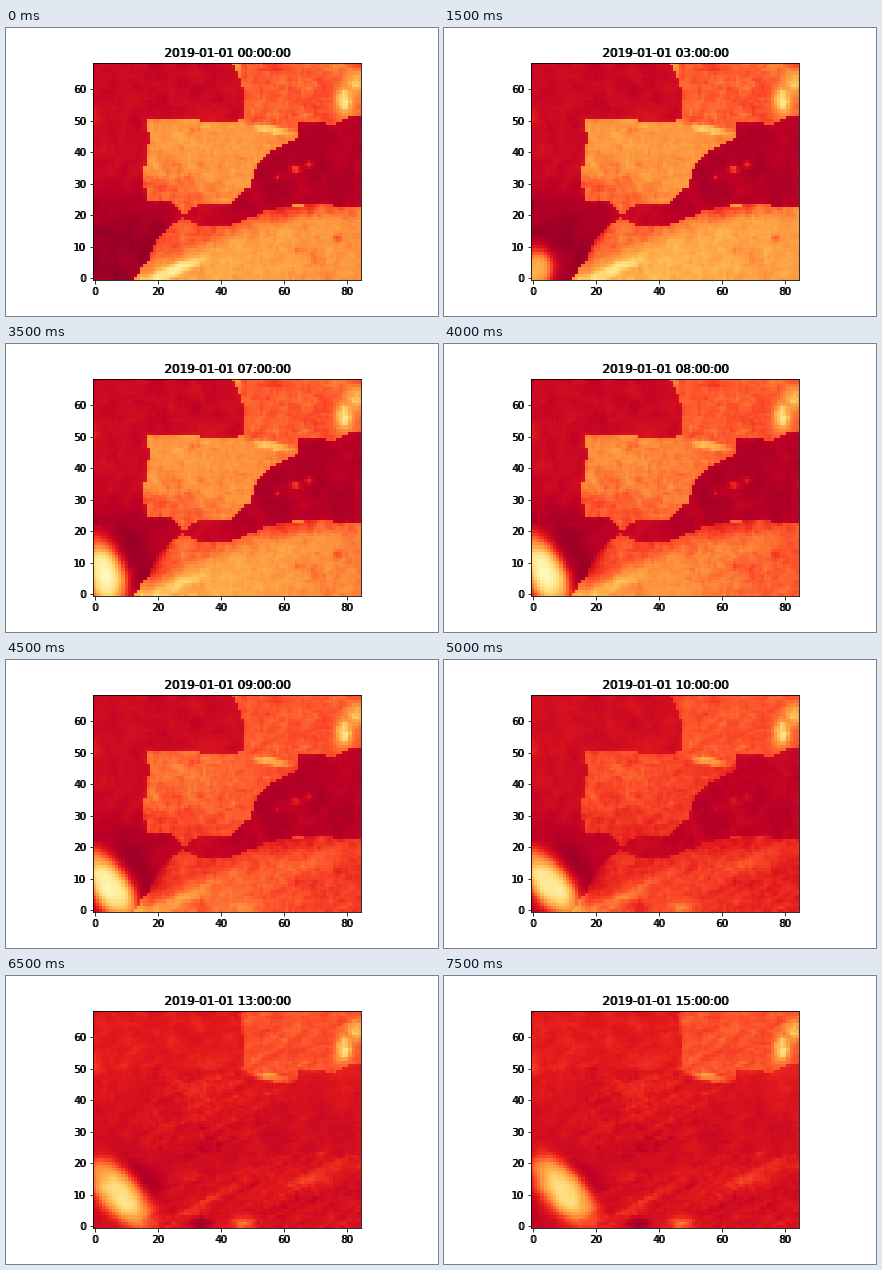
Animation, 432 px wide and 288 px high, one loop 8000 ms. Source, as a matplotlib script:

```python
import numpy as np
import matplotlib.pyplot as plt
from matplotlib.animation import FuncAnimation
from matplotlib.path import Path

NX, NY, HOURS = 85, 69, 16
X, Y = np.meshgrid(np.arange(NX), np.arange(NY))
rng = np.random.default_rng(7)


def smooth(a, n=1):
    for _ in range(n):
        p = np.pad(a, 1, mode="edge")
        a = (4 * a + p[:-2, 1:-1] + p[2:, 1:-1] + p[1:-1, :-2] + p[1:-1, 2:]) / 8
    return a


def noise(n, streak=1):
    """Smoothed random texture, optionally drawn out along a gentle slope."""
    a = smooth(rng.normal(size=(NY, NX)), n)
    a = sum(np.roll(a, (k // 2, k), (0, 1)) for k in range(streak))
    return a / a.std()


def ease(v, lo, hi):
    t = np.clip((v - lo) / (hi - lo), 0, 1)
    return t * t * (3 - 2 * t)


def bump(x, y, sx, sy, tilt=0, power=1):
    """Soft ellipse; tilt turns the long (y) axis to the left, in degrees."""
    c, s = np.cos(np.radians(tilt)), np.sin(np.radians(tilt))
    u = (X - x) * c + (Y - y) * s
    v = (Y - y) * c - (X - x) * s
    return np.exp(-((u / sx) ** 2 + (v / sy) ** 2) ** power)


def region(*pts):
    inside = Path(pts).contains_points(np.c_[X.ravel(), Y.ravel()])
    return inside.reshape(X.shape).astype(float)


europe = region(
    (43, 70), (47.4, 60), (47.2, 51), (45.5, 49.6), (16, 50.6), (17.4, 45),
    (15.4, 32), (16.6, 24.6), (24, 24.4), (28, 20), (32, 23), (43, 23.4),
    (49, 29), (51, 35), (55, 40), (64, 44.5), (64.5, 49.6), (72, 49.6),
    (75, 48.4), (80, 51), (86, 52), (86, 70))
africa = region(
    (12.3, -1), (17, 6), (20, 13), (28, 19.6), (32.5, 16.8), (43.5, 16.8),
    (55, 21.6), (66, 23.6), (86, 22.4), (86, -1))
islands = bump(63.6, 34.6, 1.4, 0.9) + 0.6 * (bump(68, 36, 1, 1) + bump(58, 32, 0.7, 0.7))
coast = europe + africa
land = np.clip(0.75 * coast + 0.25 * smooth(coast, 2) + 0.7 * islands, 0, 1)
in_africa = Y < 19 + 0.06 * X
france = smooth(1.0 * ((X > 46) & (Y + 0.15 * (X - 47) > 49)), 3)

broad, fine, streaks = noise(8), noise(1), noise(1, 6)

# Peaks stay cold all day
peaks = 0.22 * bump(56, 47.2, 1.3, 6, 80, 2)
peaks += (0.36 * bump(79, 56, 2.6, 4) + 0.3 * bump(83, 62, 2.5, 3)) * (1 + 0.25 * fine)

# Night: cold land, warm sea
iberia = 0.46 + 0.12 * ease(-Y, -42, -26) * ease(-X, -50, -20)
gaul = 0.59 + 0.06 * bump(47, 67, 7, 10) + 0.05 * bump(73, 55, 4, 9)
maghreb = 0.43 + 0.18 * ease(Y - 0.35 * X, -6, 3) + 0.06 * ease(X, 50, 75)
maghreb += 0.15 * bump(77, 13, 1.5, 1) + 0.08 * ease(Y, 17, 22)
atlas = bump(25, 2.5, 1.8, 10, -68, 1.5)
night = np.where(in_africa, maghreb, iberia + france * (gaul - iberia))
night += 0.018 * broad + 0.02 * fine - peaks
sea_tex = 0.012 * broad + 0.007 * fine
sea_night = 0.825 + 0.12 * ease(-Y, -42, -8) * ease(-X, -34, -18)
sea_night += 0.065 * ease(X - 0.8 * np.maximum(Y - 40, 0), 32, 48) + sea_tex

# Day: land and sea nearly alike
day = 0.79 - 0.17 * france - peaks - 0.07 * bump(38, 43, 16, 5)
day += 0.04 * bump(33, 26, 8, 7) + 0.14 * bump(34, 1, 4, 2)
day -= 0.09 * (bump(38, 9, 2, 13, -58) + bump(70, 16, 2.5, 17, -70))
day -= 0.22 * bump(47, 1, 3.4, 2.2)
day += 0.018 * streaks + 0.012 * fine
sea_day = 0.74 + 0.06 * ease(-Y, -55, -30) + 0.008 * streaks + sea_tex


def field(h):
    s = h / (HOURS - 1)
    warm = ease(h + (X - 40) / 40, 6, 13)  # the sun reaches the east first
    chill = 0.06 * in_africa * ease(h, 0, 5) * ease(-h, -9, -5)
    ground = night - 0.27 * atlas * in_africa * (1 - 0.5 * ease(h, 0, 5)) - chill
    ground = ground + warm * (day - ground)
    sea = sea_night + ease(h, 8, 14) * (sea_day - sea_night)
    z = sea + land * (ground - sea)

    def pull(amount, shape, level):
        return amount * shape * (level - z)

    # Dark front ahead of the bright patch, then its dark tail
    z += pull(0.9 * ease(h, 0, 5), bump(19, 15, 3.8, 8, -40, 2), 0.9 - 0.08 * s)
    z += pull(0.8 * ease(h, 0, 7), bump(13 + 3 * s, 11 + 4 * s, 4, 9, 40), 0.95)
    z += pull(0.8 * ease(h, 12, 16), bump(0, 3, 4, 9, 20), 0.9)

    x, y = 10 * s ** 1.5, 11.5 * s ** 0.8
    length, tilt = 6 + 6 * ease(h, 2, 9), 42 * ease(h, 4, 11)
    patch = bump(x, y, 6, length, tilt, 1.4)
    z += pull(ease(h, 0, 5), patch, 0.07 + 0.15 * ease(h, 8, 12) + 0.03 * broad)
    return np.clip(z, 0, 1)


fig = plt.figure(figsize=(6, 4), dpi=72, facecolor="white")


def add_axes(shift=0, **kw):
    ax = fig.add_axes([0.125 + shift / 432, 0.125, 0.775, 0.755], **kw)
    ax.set(xlim=(-0.5, NX - 0.5), ylim=(-0.5, NY - 0.5), aspect="equal",
           xticks=range(0, 81, 20), yticks=range(0, 61, 10))
    return ax


base = add_axes()
base.tick_params(labelbottom=False, labelleft=False)
image = base.imshow(field(0), cmap="YlOrRd", vmin=0, vmax=1,
                    origin="lower", interpolation="nearest")

# Lettering is printed twice, half a pixel to each side, for a heavy look
titles = []
for shift in (-0.5, 0.5):
    ax = add_axes(shift, frameon=False)
    ax.tick_params(length=0, pad=7)
    titles.append(ax.set_title("", fontsize=12))


def draw(h):
    image.set_data(field(h))
    for t in titles:
        t.set_text(f"2019-01-01 {h:02d}:00:00")
    return [image, *titles]


anim = FuncAnimation(fig, draw, frames=HOURS, interval=500, repeat=True)
plt.show()
```
